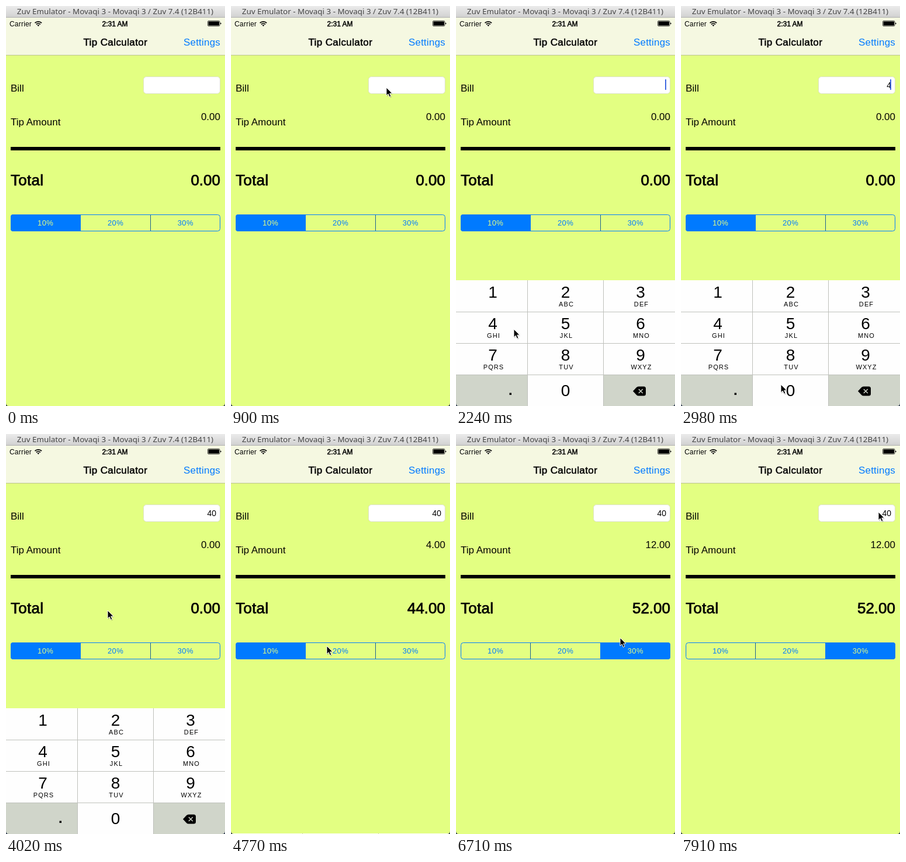
Write an HTML page that moves like this. It is 375x687 px and loops after 8000 ms.

```html
<!DOCTYPE html>
<html lang="en">
<head>
<meta charset="utf-8">
<title>Tip Calculator</title>
<style>
  html, body { margin: 0; width: 100%; height: 100%; overflow: hidden; background: #e3ff82; }
  svg { display: block; width: 375px; height: 687px; font-family: "Liberation Sans", Arial, sans-serif; }
  .end { text-anchor: end; }
  .mid { text-anchor: middle; }
  .body { font-size: 17px; }
  .medium { stroke: #000; stroke-width: .5px; }
  .big { font-size: 26px; stroke: #000; stroke-width: .75px; }
  .seg { font-size: 13px; letter-spacing: .4px; }
  .digit { font-size: 28px; }
  .letters { font-size: 11px; letter-spacing: 1.1px; }
</style>
</head>
<body>
<svg viewBox="0 0 375 687" xmlns="http://www.w3.org/2000/svg">
  <defs>
    <linearGradient id="bar" x1="0" y1="0" x2="0" y2="1">
      <stop offset="0" stop-color="#ebebeb"/><stop offset="1" stop-color="#d0d0d0"/>
    </linearGradient>
    <clipPath id="segClip"><rect x="8" y="358" width="359" height="29" rx="4"/></clipPath>
  </defs>

  <rect width="375" height="687" fill="#e3ff82"/>
  <rect y="20" width="375" height="64" fill="#f5f8e1"/>
  <rect y="84" width="375" height="1" fill="#bcc58e"/>
  <rect width="375" height="20" fill="url(#bar)"/>
  <rect y="19" width="375" height="1" fill="#b0b0b0"/>
  <text class="mid" x="187" y="14" fill="#444" style="font:13.4px 'Noto Sans',sans-serif">Zuv Emulator - Movaqi 3 - Movaqi 3 / Zuv 7.4 (12B411)</text>

  <text x="6" y="34.5" font-size="12" letter-spacing=".2">Carrier</text>
  <g fill="none" stroke="#000" stroke-width="1.8">
    <path d="M49.5 29.2a8.2 8.2 0 0 1 11.6 0M51.8 31.5a5 5 0 0 1 7 0"/>
    <path d="M55.3 35l-1.9-1.9a2.7 2.7 0 0 1 3.8 0z" fill="#000" stroke="none"/>
  </g>
  <text class="mid medium" x="186.5" y="34.5" font-size="12">2:31 AM</text>
  <rect x="345.5" y="25.5" width="20.5" height="9" rx="1.5" fill="none" stroke="#000" stroke-width=".7"/>
  <rect x="346.5" y="26.5" width="18.5" height="7" rx=".6"/>
  <path d="M367 28.5q1.6 .3 1.6 1.5t-1.6 1.5z"/>

  <text class="mid body medium" x="187.3" y="68" letter-spacing=".4">Tip Calculator</text>
  <text class="end body" x="367" y="68" fill="#007aff" letter-spacing=".2">Settings</text>

  <text class="body" x="8" y="147">Bill</text>
  <rect x="235.5" y="121.5" width="131" height="29" rx="5" fill="#fff" stroke="#dce2c6"/>
  <text id="bill" class="end" x="360" y="141" font-size="14"></text>
  <rect id="caret" x="358" y="126" width="2" height="18" fill="#4169e1"/>
  <text class="body" x="8" y="205">Tip Amount</text>
  <text id="tip" class="end body" x="367" y="196"></text>
  <rect x="8" y="242" width="359" height="6"/>
  <text class="big" x="8" y="308" letter-spacing=".25">Total</text>
  <text id="total" class="end big" x="367" y="308"></text>

  <path d="M127.5 358v29M247.5 358v29" stroke="#1a5f90"/>
  <rect id="pick" y="358" width="121" height="29" fill="#007aff" clip-path="url(#segClip)"/>
  <rect x="8.5" y="358.5" width="358" height="28" rx="4" fill="none" stroke="#007aff"/>
  <g id="segs"></g>

  <g id="pad"></g>
  <path d="M0 682v5h5q-5 0-5-5zM375 682v5h-5q5 0 5-5z" fill="#26324a"/>
  <g id="cursor">
    <path d="M2 1.5v14l3.3-3 2.2 5 2.4-1-2.2-5h4.3z" opacity=".25"/>
    <path d="M1 0v14l3.2-3 2.2 5.2 2.5-1.1-2.2-5h4.4z" stroke="#fff"/>
  </g>
</svg>
<script>
const LOOP = 8000, TICK = 148.6, PAD_TOP = 471, BLUE = '#007aff', BG = '#e3ff82', GRAY = '#d0d5ca';
const $ = id => document.getElementById(id);

function add(parent, tag, attrs, text = '') {
  const el = document.createElementNS('http://www.w3.org/2000/svg', tag);
  for (const k in attrs) el.setAttribute(k, attrs[k]);
  el.textContent = text;
  return parent.appendChild(el);
}

// Segments
const segs = [10, 20, 30].map((p, i) =>
  add($('segs'), 'text', { class: 'mid seg', x: 67.7 + 119.8 * i, y: 377 }, p + '%'));

// Number pad
const pad = $('pad'), keys = {};
const colX = [0, 123, 253, 375], midX = [63, 187.5, 316];
const faces = ['1', '2 ABC', '3 DEF', '4 GHI', '5 JKL', '6 MNO', '7 PQRS', '8 TUV', '9 WXYZ', '', '0', ''];
faces.forEach((face, i) => {
  const c = i % 3, y = Math.floor(i / 3) * 54, [digit, letters] = face.split(' ');
  const cell = add(pad, 'rect', { x: colX[c], y, width: colX[c + 1] - colX[c], height: 54, fill: digit ? '#fefefe' : GRAY });
  if (!digit) return;
  keys[digit] = cell;
  add(pad, 'text', { class: 'mid digit', x: midX[c], y: y + (digit === '0' ? 37 : 30) }, digit);
  if (letters) add(pad, 'text', { class: 'mid letters', x: midX[c] + 1.5, y: y + 45 }, letters);
});
add(pad, 'path', { d: 'M0 54.5H375M0 108.5H375M0 162.5H375M122.5 0V216M252.5 0V216', stroke: '#bfc1bc', fill: 'none' });
add(pad, 'rect', { x: 91.5, y: 193.5, width: 3.5, height: 3.5 });
add(pad, 'path', { d: 'M303 190.5l6-6.5q1.5-1.5 3.5-1.5h9q3.5 0 3.5 3.5v9q0 3.5-3.5 3.5h-9q-2 0-3.5-1.5z' });
add(pad, 'path', { d: 'M312.8 187l7 7m0-7l-7 7', stroke: GRAY, 'stroke-width': 1.5 });

// Pointer path: tick, x, y
const path = [
  [3, 247, 239], [5, 286, 165], [6, 265, 140], [9, 265, 140], [10, 255, 180], [13, 140, 480],
  [15, 98, 555], [17, 67, 565], [18, 74, 570], [20, 170, 650], [21, 187, 662], [23, 188, 663],
  [25, 183, 460], [27, 173, 303], [30, 171, 308], [32, 163, 364], [34, 184, 373], [36, 190, 375],
  [39, 293, 377], [44, 293, 377], [45, 280, 350], [47, 195, 225], [48, 184, 170], [50, 260, 129],
  [51, 260, 129], [53, 337, 134]
];

function pointer(n) {
  const i = path.findIndex(p => p[0] >= n);
  if (i < 1) return path[0].slice(1);
  const [a, ax, ay] = path[i - 1], [b, bx, by] = path[i], k = (n - a) / (b - a);
  return [ax + (bx - ax) * k, ay + (by - ay) * k];
}

function padTop(n) {
  if (n < 8 || n > 32) return 700;
  if (n < 10) return n === 8 ? 620 : 498;
  return n < 31 ? PAD_TOP : n === 31 ? 560 : 686;
}

function draw(t) {
  const n = Math.min(53, Math.floor(t / TICK));
  const bill = n < 17 ? '' : n < 21 ? '4' : '40';
  const pick = n < 35 ? 0 : n < 40 ? 1 : 2;
  const tip = n < 31 ? 0 : 40 * (pick + 1) / 10;
  $('bill').textContent = bill;
  $('tip').textContent = tip.toFixed(2);
  $('total').textContent = (tip && 40 + tip).toFixed(2);

  $('pick').setAttribute('x', 7 + 120 * pick);
  segs.forEach((s, i) => s.setAttribute('fill', i === pick ? BG : BLUE));

  const edited = n < 17 ? 8 : n < 21 ? 17 : 21;
  const blink = n >= 8 && n < 31 && (n - edited) % 7 < 4;
  $('caret').setAttribute('visibility', blink ? 'visible' : 'hidden');

  pad.setAttribute('transform', `translate(0 ${padTop(n)})`);
  keys[4].setAttribute('fill', n === 17 ? GRAY : '#fefefe');
  keys[0].setAttribute('fill', n === 21 ? GRAY : '#fefefe');

  const [x, y] = pointer(n);
  $('cursor').setAttribute('transform', `translate(${x} ${y})`);
  $('cursor').setAttribute('visibility', n < 3 ? 'hidden' : 'visible');
}

let start;
function loop(now) {
  start ??= now;
  draw((now - start) % LOOP);
  requestAnimationFrame(loop);
}
draw(0);
requestAnimationFrame(loop);
</script>
</body>
</html>
```
